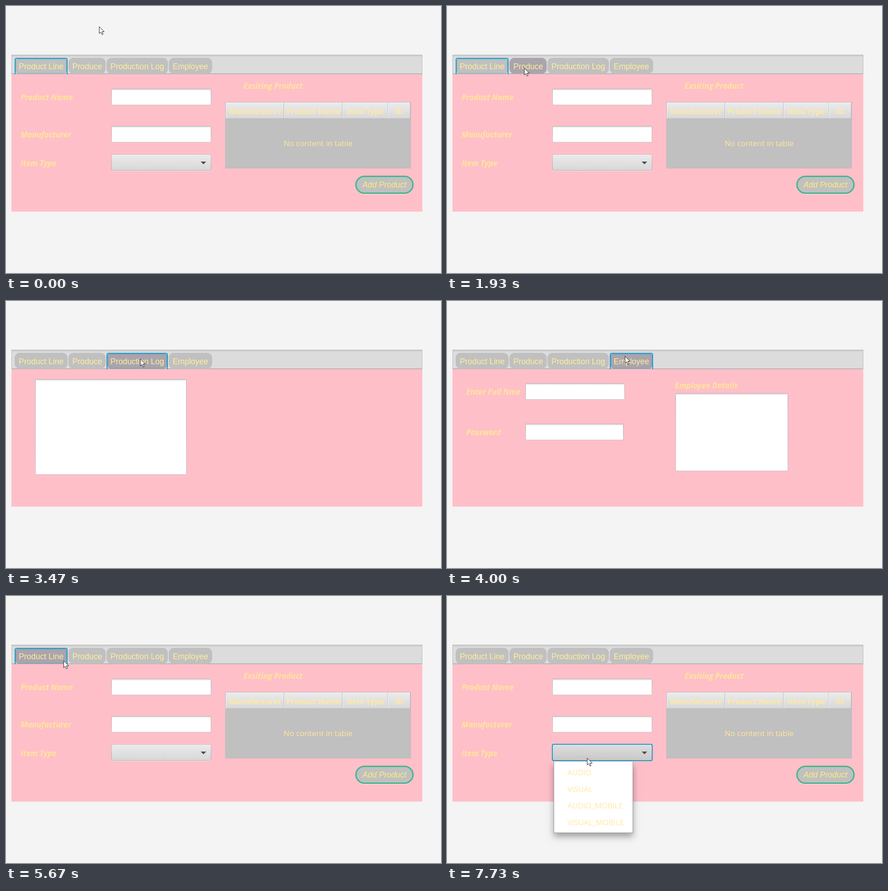
These frames come from a looping animation (954 px wide and 587 px high, 8 s). An HTML page with a canvas:

```html
<!DOCTYPE html>
<html lang="en">
<head>
<meta charset="utf-8">
<title>Production form</title>
<style>
  html, body { margin: 0; width: 100%; height: 100%; overflow: hidden; background: #f4f4f4; }
  canvas { display: block; }
</style>
</head>
<body>
<canvas id="stage" width="954" height="587"></canvas>
<script>
const ctx = document.getElementById('stage').getContext('2d');
const LOOP = 8000;
const BLUE = '#1c9ac9', SILVER = '#c0c0c0', LABEL = '#ffe599';
const ARIAL = '17.5px "Liberation Sans", Arial, sans-serif';
const HUMANIST = '17px "Open Sans", "Noto Sans", sans-serif';

const TABS = [
  { name: 'Product Line', x: 19, w: 116, textX: 28 },
  { name: 'Produce', x: 137, w: 81.5, textX: 145.5 },
  { name: 'Production Log', x: 220.5, w: 134.5, textX: 229 },
  { name: 'Employee', x: 357, w: 95, textX: 365.5 }
];
const TAB_TOP = 114, TAB_HEIGHT = 35;

// Tab clicks: [time, tab index]
const CLICKS = [[0, 0], [2200, 1], [3130, 2], [4000, 3], [5270, 0]];
const COMBO_FOCUS = 6470, POPUP_OPEN = 7730;
const COMBO = { x: 231, y: 326, w: 219, h: 36 };

// Pointer strokes: quadratic curves, sampled in discrete steps
const MOVES = [
  { start: 600, end: 1000, steps: 7, from: [204, 45], via: [180, 150], to: [152, 260] },
  { start: 1330, end: 1930, steps: 10, from: [152, 260], via: [80, 190], to: [169, 136] },
  { start: 2470, end: 2870, steps: 7, from: [169, 136], via: [204, 134], to: [240, 130] },
  { start: 3400, end: 3670, steps: 5, from: [240, 130], via: [318, 125], to: [390, 121] },
  { start: 4270, end: 4930, steps: 11, from: [390, 121], via: [255, 148], to: [120, 133] },
  { start: 5670, end: 6200, steps: 9, from: [120, 133], via: [200, 258], to: [307, 356] }
];

const ease = p => p * p * (3 - 2 * p);

function pointerAt(t) {
  let pos = MOVES[0].from;
  for (const m of MOVES) {
    if (t < m.start) break;
    const interval = (m.end - m.start) / (m.steps - 1);
    const step = Math.min(m.steps, Math.floor((t - m.start) / interval + 0.001) + 1);
    const p = ease(step / m.steps), q = 1 - p;
    pos = m.from.map((a, i) => Math.round(q * q * a + 2 * q * p * m.via[i] + p * p * m.to[i]));
  }
  return pos;
}

const inside = ([px, py], r) => px >= r.x && px < r.x + r.w && py >= r.y && py < r.y + r.h;

function text(str, x, y, font, color, align = 'left') {
  ctx.font = font;
  ctx.fillStyle = color;
  ctx.textAlign = align;
  ctx.fillText(str, x, y);
}

const label = (str, x, y) => text(str, x, y, 'italic bold ' + HUMANIST, LABEL);

function rect(x, y, w, h, color) {
  ctx.fillStyle = color;
  ctx.fillRect(x, y, w, h);
}

function round(x, y, w, h, r, fill, stroke, line = 1) {
  ctx.beginPath();
  ctx.roundRect(x, y, w, h, r);
  if (fill) { ctx.fillStyle = fill; ctx.fill(); }
  if (stroke) { ctx.strokeStyle = stroke; ctx.lineWidth = line; ctx.stroke(); }
}

function vertical(y, h, ...colors) {
  const g = ctx.createLinearGradient(0, y, 0, y + h);
  colors.forEach((c, i) => g.addColorStop(i / (colors.length - 1), c));
  return g;
}

function field(x, y, w, h, r = 3) {
  round(x, y, w, h, r, vertical(y, h, '#b0b0b0', '#c4c4c4'));
  round(x + 1, y + 1, w - 2, h - 2, r - 1, '#fff');
  rect(x + 2, y + 1, w - 4, 4, vertical(y + 1, 4, '#e4e4e4', '#fff'));
}

function arrow(x, y) {
  ctx.fillStyle = '#4c4c4c';
  ctx.beginPath();
  ctx.moveTo(x - 6, y - 3);
  ctx.lineTo(x + 6, y - 3);
  ctx.lineTo(x, y + 3);
  ctx.fill();
}

function pillButton(str, x, y, w, h) {
  round(x + 1.5, y + 2.5, w - 3, h - 2, 19, null, 'rgba(255,255,255,.4)', 2);
  round(x + 1.5, y + 1.5, w - 3, h - 3, 18.5, SILVER, '#45b68c', 3);
  text(str, x + w / 2, y + 26, 'italic ' + ARIAL, '#fbed78', 'center');
}

function combo(focused, hovered, pressed) {
  const { x, y, w, h } = COMBO;
  const [top, bottom] = pressed ? ['#dedede', '#c8c8c8']
    : hovered ? ['#f4f4f4', '#e0e0e0'] : ['#ebebeb', '#d7d7d7'];
  round(x, y + 1, w, h, 4, 'rgba(255,255,255,.7)');
  round(x, y, w, h, 4, vertical(y, h, '#bdbdbd', '#a9a9a9'));
  round(x + 1, y + 1, w - 2, h - 2, 3, vertical(y, h, pressed ? '#e6e6e6' : '#fafafa', bottom));
  round(x + 2, y + 2, w - 4, h - 4, 2, vertical(y, h, top, bottom));
  if (focused) round(x, y, w, h, 3, null, BLUE, 2);
  arrow(433, 345);
}

function table() {
  rect(481, 211, 407, 146, '#c6c6c6');
  rect(482, 248, 405, 108, SILVER);
  const edges = [482, 610, 738, 837.5, 887];
  ['Manufacturer', 'Product Name', 'Item Type', 'ID'].forEach((name, i) => {
    const x = edges[i], w = edges[i + 1] - x;
    rect(x, 212, w, 36, '#f3f3f3');
    rect(x + 1, 213, w - 2, 35, vertical(213, 35, '#ebebeb', '#d7d7d7'));
    rect(x + w - 1, 212, 1, 36, '#b9b9b9');
    text(name, x + w / 2, 238, 'bold 16.5px "Open Sans", "Noto Sans", sans-serif', '#ffe9a2', 'center');
  });
  rect(481, 247, 407, 1, '#bababa');
  ctx.strokeStyle = '#b9b9b9';
  ctx.lineWidth = 1;
  ctx.strokeRect(481.5, 211.5, 406, 145);
  text('No content in table', 684.5, 308, HUMANIST, LABEL, 'center');
}

function productLinePage(t, pointer) {
  label('Product Name', 32, 207);
  label('Manufacturer', 32, 289);
  label('Item Type', 32, 352);
  label('Exsiting Product', 521, 182);
  field(231, 182, 219, 36);
  field(231, 264, 219, 36);
  combo(t >= COMBO_FOCUS, inside(pointer, COMBO), t >= POPUP_OPEN);
  table();
  pillButton('Add Product', 766, 373, 128, 40);
}

function producePage() {
  label('Choose Product', 23, 188);
  label('Choose Quantity', 20, 310);
  rect(159, 162, 252, 101, '#c6c6c6');
  rect(160, 163, 250, 99, '#fff');
  round(191, 298, 220, 36, 4, 'rgba(255,255,255,.7)');
  round(191, 297, 220, 36, 4, '#b3b3b3');
  round(192, 298, 184, 34, [3, 0, 0, 3], '#fff');
  rect(194, 298, 181, 3, vertical(298, 3, '#e4e4e4', '#fff'));
  round(377, 298, 33, 34, [0, 3, 3, 0], vertical(298, 34, '#f0f0f0', '#d8d8d8'));
  arrow(393, 316);
  text('1', 203, 322, HUMANIST, '#333');
  pillButton('Record Production', 240, 363, 177, 40);
}

function logPage() {
  field(64, 172, 332, 210, 2);
}

function employeePage() {
  label('Enter Full Nme', 42, 206);
  label('Password', 42, 295);
  label('Employee Details', 500, 192);
  field(172, 181, 218, 36);
  field(172, 270, 215, 36);
  field(501, 203, 247, 171, 2);
}

const PAGES = [productLinePage, producePage, logPage, employeePage];

function tabBar(selected, focused, pointer) {
  rect(12, 107, 901, 43, '#b9b9b9');
  rect(13, 108, 899, 41, '#dcdcdc');
  rect(13, 107, 899, 5, vertical(107, 5, '#bebebe', '#dcdcdc'));
  rect(12, 148, 901, 2, '#b7b7b7');
  TABS.forEach((tab, i) => {
    const hovered = inside(pointer, { x: tab.x, y: TAB_TOP, w: tab.w, h: TAB_HEIGHT });
    round(tab.x, TAB_TOP, tab.w, TAB_HEIGHT, 11, hovered ? '#aaa4ad' : SILVER);
    if (i === selected && focused) focusRing(tab);
    text(tab.name, tab.textX, 139, ARIAL, '#fdee9a');
  });
}

function focusRing({ x, w }) {
  round(x + 3, TAB_TOP + 3, w - 6, TAB_HEIGHT - 4, 5, null, 'rgba(3,158,211,.2)', 2);
  ctx.strokeStyle = BLUE;
  ctx.lineWidth = 2;
  ctx.beginPath();
  ctx.moveTo(x + 1, 150);
  ctx.lineTo(x + 1, TAB_TOP + 3);
  ctx.lineTo(x + 3, TAB_TOP + 1);
  ctx.lineTo(x + w - 3, TAB_TOP + 1);
  ctx.lineTo(x + w - 1, TAB_TOP + 3);
  ctx.lineTo(x + w - 1, 150);
  ctx.stroke();
}

function popup() {
  ctx.save();
  ctx.shadowColor = 'rgba(0,0,0,.35)';
  ctx.shadowBlur = 14;
  ctx.shadowOffsetY = 8;
  rect(234, 364, 174, 157, '#9c9c9c');
  ctx.restore();
  rect(235, 364, 172, 156, '#fff');
  ['AUDIO', 'VISUAL', 'AUDIO_MOBILE', 'VISUAL_MOBILE'].forEach((name, i) =>
    text(name, 264, 394 + i * 36.6, '16.7px "Open Sans", "Noto Sans", sans-serif', '#ffe7a4'));
}

function drawPointer([x, y]) {
  const outline = [[0, 0], [0, 15], [3.5, 12], [6, 17.5], [8.5, 16.5], [6, 11], [11, 11]];
  ctx.beginPath();
  outline.forEach(([dx, dy]) => ctx.lineTo(x + 0.5 + dx, y + 0.5 + dy));
  ctx.closePath();
  ctx.fillStyle = '#fff';
  ctx.fill();
  ctx.strokeStyle = '#222';
  ctx.lineWidth = 1;
  ctx.stroke();
}

function draw(t) {
  const pointer = pointerAt(t);
  const selected = CLICKS.filter(([time]) => time <= t).pop()[1];
  rect(0, 0, 954, 587, '#f4f4f4');
  rect(12, 150, 901, 302, '#ffbfc9');
  tabBar(selected, t < COMBO_FOCUS, pointer);
  PAGES[selected](t, pointer);
  if (t >= POPUP_OPEN) popup();
  drawPointer(pointer);
}

const origin = performance.now();
function frame() {
  draw((performance.now() - origin) % LOOP);
  requestAnimationFrame(frame);
}
frame();
</script>
</body>
</html>
```
